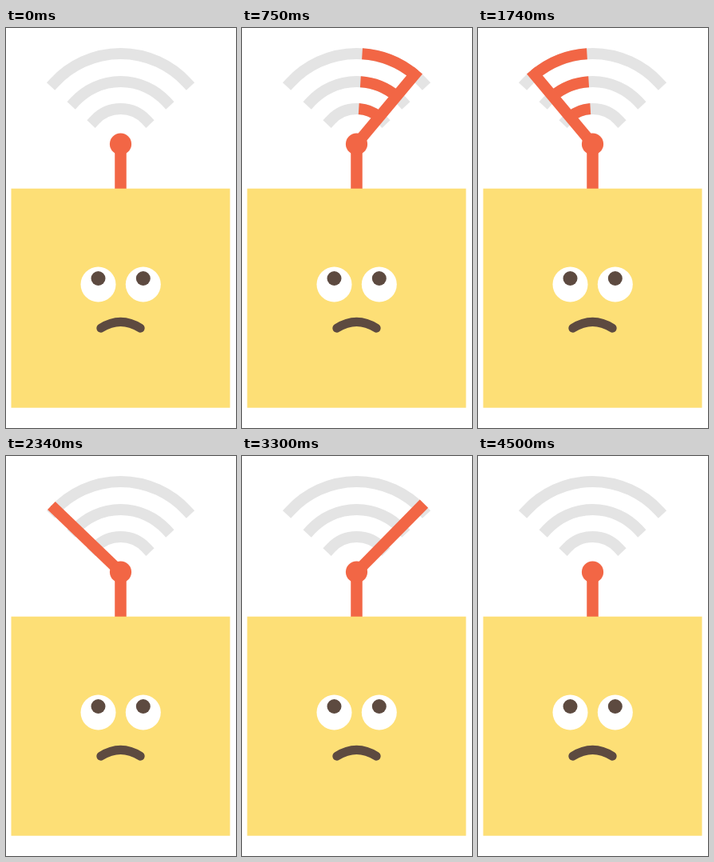
An HTML page that plays this animation: 288x500 px, repeating every 4800 ms.

```html
<!DOCTYPE html>
<html lang="en">
<head>
<meta charset="utf-8">
<title>Searching for signal</title>
<style>
  html, body { margin: 0; width: 100%; height: 100%; overflow: hidden; background: #fff; }
  svg { display: block; width: 100%; height: 100%; }
</style>
</head>
<body>
<svg viewBox="0 0 288 500">
  <g transform="translate(143.5 145)" fill="none" stroke-width="14">
    <g id="waves" stroke="#e4e4e4" stroke-linecap="square"></g>
    <path id="trail" stroke="#f26645"/>
    <path id="needle" fill="#f26645"/>
    <path d="M0 0V56" stroke="#f26645" stroke-width="14.5"/>
    <circle r="13.6" fill="#f26645"/>
  </g>
  <rect x="6.5" y="200.7" width="274" height="274" fill="#fddf76"/>
  <g id="eyes"></g>
  <path d="M118.8 375.2Q143.5 359.6 168.2 375.2" fill="none" stroke="#5d4a40" stroke-width="11" stroke-linecap="round"/>
</svg>
<script>
const LOOP = 4800, STEP = 30;
const SPAN = 47;              // half-angle of the waves, degrees
const RADII = [44, 78, 113];
const REACH = 120;            // needle length
const SWEEPS = [[330, 1], [1320, -1], [2310, 1]];

const $ = id => document.getElementById(id);
const lerp = (a, b, p) => a + (b - a) * p;
const ease = p => (1 - Math.cos(Math.PI * p)) / 2;
const progress = (t, start, length) =>
  ease(Math.min(1, Math.max(0, (t - start) / length)));

function polar(r, deg) {
  const a = deg * Math.PI / 180;
  return `${(r * Math.sin(a)).toFixed(3)} ${(-r * Math.cos(a)).toFixed(3)}`;
}

function arcs(from, to) {
  const a = Math.min(from, to), b = Math.max(from, to);
  if (b - a < 0.01) return "";
  return RADII.map(r => `M${polar(r, a)}A${r} ${r} 0 0 1 ${polar(r, b)}`).join("");
}

$("waves").innerHTML = `<path d="${arcs(-SPAN, SPAN)}"/>`;
$("eyes").innerHTML = [115.5, 171.8].map(x =>
  `<circle cx="${x}" cy="320.5" r="22" fill="#fff"/>
   <circle cx="${x}" cy="313" r="9" fill="#5d4a40"/>`).join("");

function draw(t) {
  let angle = -SPAN, tail = -SPAN;
  for (const [start, dir] of SWEEPS) {
    if (t < start) break;
    angle = dir * lerp(-SPAN, SPAN, progress(t, start, 510));
    tail = dir * lerp(-SPAN, SPAN, progress(t, start + 95, 620));
  }

  // The needle swings upright and becomes the exclamation mark.
  const morph = progress(t, 3270, 210);
  if (t >= 3270) {
    angle = SPAN * (1 - morph);
    tail = angle;
  }
  const base = 36 * morph;
  const size = progress(t, 0, 300) * (1 - progress(t, 4200, 300));
  const tip = lerp(base, REACH, size);
  const half = lerp(7, lerp(7, 13.8, morph), size);

  $("trail").setAttribute("d", arcs(tail, angle));
  $("needle").setAttribute("d", size > 0.001
    ? `M${-half} ${-tip}H${half}L7 ${-base}H-7Z` : "");
  $("needle").setAttribute("transform", `rotate(${angle})`);

  const shut = progress(t, 3600, 120) - progress(t, 3720, 120);
  $("eyes").setAttribute("transform",
    `translate(0 320.5) scale(1 ${1 - 0.9 * shut}) translate(0 -320.5)`);
}

const begin = performance.now();
function tick() {
  const t = (performance.now() - begin) % LOOP;
  draw(Math.floor(t / STEP) * STEP);
  requestAnimationFrame(tick);
}
draw(0);
requestAnimationFrame(tick);
</script>
</body>
</html>
```
